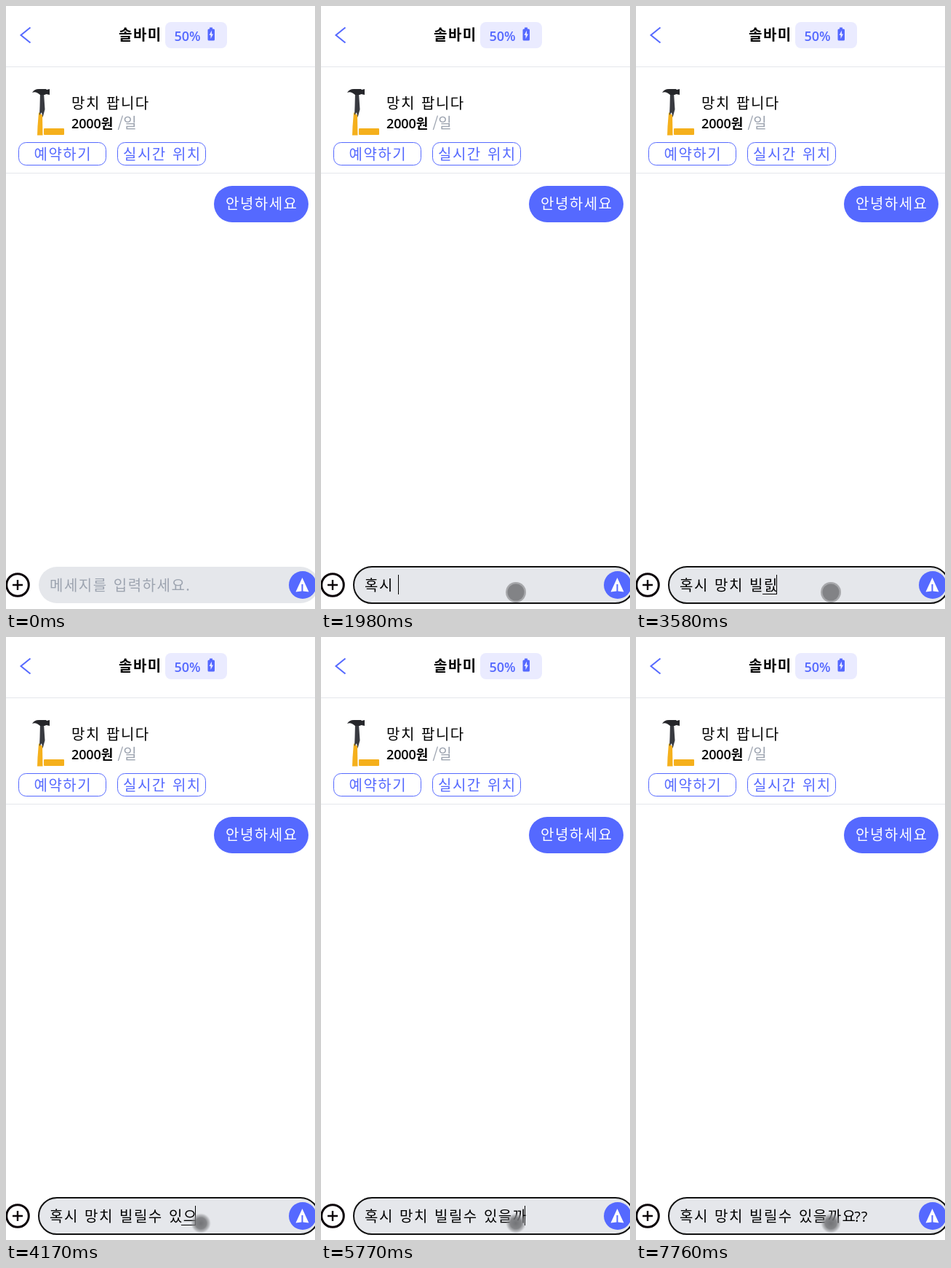
Recreate the animation shown at these times as an HTML page. Size 425 by 828 pixels, loop 8 s.

```html
<!DOCTYPE html>
<html lang="ko">
<head>
<meta charset="utf-8">
<title>Chat</title>
<style>
  html, body { margin: 0; width: 100%; height: 100%; overflow: hidden; background: #fff; }
  svg { display: block; }
  text {
    font: 350 20px "Noto Sans CJK KR", "Noto Sans CJK", sans-serif;
    letter-spacing: 1.5px; word-spacing: 1.1px; white-space: pre;
  }
  .bold { font-weight: 700; }
  .num { font: 600 18px "Open Sans", "Noto Sans CJK KR", sans-serif; letter-spacing: 0; }
  .price { letter-spacing: -.1px; }
  .unit { letter-spacing: 0; }
  .blue { fill: #5569ff; }
  .muted { fill: #9ca3af; }
  .hint { font-size: 16px; letter-spacing: 1.2px; word-spacing: .9px; fill: #757575; }
  .mark { font-family: "Open Sans", sans-serif; font-weight: 400; letter-spacing: 1.1px; }
  .rule { stroke: #e5e7eb; }
  .button { fill: #fff; stroke: #5569ff; }
</style>
</head>
<body>
<svg width="425" height="828" viewBox="0 0 425 828">
  <defs>
    <radialGradient id="soft">
      <stop offset="0" stop-color="#66676a" stop-opacity=".9"/>
      <stop offset=".55" stop-color="#737477" stop-opacity=".85"/>
      <stop offset=".8" stop-color="#8b8c8f" stop-opacity=".5"/>
      <stop offset="1" stop-color="#a5a6a9" stop-opacity="0"/>
    </radialGradient>
    <filter id="shadow" x="-10%" y="-10%" width="120%" height="125%">
      <feDropShadow dx="0" dy="1" stdDeviation="1.8" flood-opacity=".24"/>
    </filter>
  </defs>

  <!-- Header -->
  <path d="M33.5 29.5 20.5 40 33.5 50.5" fill="none" stroke="#5569ff" stroke-width="2"/>
  <text class="bold" x="155" y="47">솔바미</text>
  <rect x="219" y="22" width="85" height="36" rx="8" fill="#eaebff"/>
  <text class="num blue" x="231.5" y="48">50%</text>
  <path class="blue" d="M280 29.5h4v2h1.5q1.5 0 1.5 1.5v13q0 1.5-1.5 1.5h-6.5q-1.5 0-1.5-1.5v-13q0-1.5 1.5-1.5h1z"/>
  <path d="M283 33.5l-3.5 6.5h2v5l3.5-6.5h-2z" fill="#eaebff"/>
  <path class="rule" d="M0 83.5H425M0 229.5H425"/>

  <!-- Item -->
  <path d="M45 146 50 150 50.5 177.5H43L43.5 165z" fill="#f5b01c"/>
  <path d="M47 119H52L53.5 142 50.5 153 49 146 46 150 46.5 138z" fill="#383a40"/>
  <path d="M36 119Q39 114 45 114H55L56 115 60 114V122L55.5 121 53 122H47Q41 116.5 36 119z" fill="#26272b"/>
  <rect x="52" y="168" width="28" height="9" rx="1" fill="#f5b01c"/>
  <text x="90" y="140.5">망치 팝니다</text>
  <text class="num price" x="90" y="167.5">2000원</text>
  <text class="muted unit" x="153.5" y="168">/일</text>
  <rect class="button" x="17.5" y="187.5" width="120" height="31" rx="10"/>
  <text class="blue" x="38.5" y="210.5">예약하기</text>
  <rect class="button" x="153.5" y="187.5" width="121" height="31" rx="10"/>
  <text class="blue" x="161" y="210.5">실시간 위치</text>

  <!-- Message -->
  <rect class="blue" x="286" y="247" width="130" height="50" rx="25"/>
  <text x="302" y="279" fill="#fff">안녕하세요</text>

  <!-- Input bar -->
  <g fill="none" stroke="#0b0408">
    <circle cx="16" cy="795" r="15.3" stroke-width="3"/>
    <path d="M16 788V802M9 795H23" stroke-width="2.4"/>
  </g>
  <rect id="field" x="45" y="770" width="385" height="50" rx="25" fill="#e5e7eb" stroke-width="2"/>
  <text id="empty" class="muted" x="60" y="802.5">메세지를 입력하세요.</text>
  <text id="typed" x="60" y="802.5"></text>
  <text id="marks" class="mark" y="802.5"></text>
  <rect id="under" y="807" width="19" height="1"/>
  <rect id="caret" y="781" width="1" height="27"/>
  <circle class="blue" cx="408" cy="795" r="19"/>
  <path d="M407.5 785 398.5 804.5 406.5 803.5V794H408.5V803.5L416.5 804.5z" fill="#fff"/>

  <!-- Suggestions -->
  <g id="popup">
    <path d="M173 659H388Q392 659 392 663V755Q392 759 388 759H205L195.5 768 186 759H173Q169 759 169 755V663Q169 659 173 659z" fill="#fff" filter="url(#shadow)"/>
    <text class="hint" x="184.5" y="692">안녕하세요</text>
    <text class="hint" x="184.5" y="737">삼각대 대여 가능할까요?</text>
  </g>

  <g id="pointer">
    <g id="ring">
      <circle r="14" fill="#a7a8ab"/>
      <circle r="11.5" fill="#828386"/>
    </g>
    <circle id="blur" r="14" fill="url(#soft)"/>
  </g>
</svg>
<script>
const LOOP = 8000, START = 60, FOCUS = 460, BLINK = 530;
const HANGUL = 19.9, SPACE = 7.1, MARK = 9.85;
const el = id => document.getElementById(id);
const [field, empty, typed, marks, under, caret, popup, pointer, ring, blur] =
  ["field", "empty", "typed", "marks", "under", "caret", "popup", "pointer", "ring", "blur"].map(el);

// time, number of finished characters, syllable being composed
const line = "혹시 망치 빌릴수 있을까요??";
const keys = [
  [FOCUS, 0, ""], [920, 0, "ㅎ"], [980, 0, "호"], [1380, 0, "혹"],
  [1780, 0, "혻"], [1850, 1, "시"], [1980, 3, ""],
  [2170, 3, "ㅁ"], [2240, 3, "마"], [2310, 3, "망"],
  [2500, 4, "ㅊ"], [2570, 4, "치"], [2700, 6, ""],
  [2840, 6, "ㅂ"], [2900, 6, "비"], [2970, 6, "빌"],
  [3180, 7, "ㄹ"], [3250, 7, "리"], [3380, 7, "릴"], [3580, 7, "릸"],
  [3650, 8, "수"], [3720, 10, ""],
  [3840, 10, "ㅇ"], [3910, 10, "이"], [3980, 10, "있"],
  [4100, 11, "ㅇ"], [4170, 11, "으"], [4310, 11, "을"],
  [4500, 12, "ㄲ"], [4570, 12, "까"], [4770, 12, "깡"], [4900, 13, "요"],
  [5570, 13, "ㅇ"], [5770, 13, ""], [6100, 12, ""],
  [6300, 12, "ㄲ"], [6370, 12, "까"], [6570, 12, "깡"], [6630, 13, "요"],
  [7090, 15, ""], [7230, 16, ""]
];
const path = [[130, 292, 828], [190, 282, 818], [250, 273, 809], [320, 268, 805]];
const fade = [[0, 0], [FOCUS, .6], [520, 1], [980, .5], [1050, 0]];

const at = (list, t) => list.filter(k => k[0] <= t).pop();
const advance = c => c === " " ? SPACE : c === "?" ? MARK : HANGUL;
const width = s => [...s].reduce((sum, c) => sum + advance(c), 0);
const show = (node, on) => node.setAttribute("visibility", on ? "inherit" : "hidden");

function drawInput(t) {
  const key = at(keys, t);
  const [since, count, part] = key || [0, 0, ""];
  const done = line.slice(0, count), text = done + part;
  const words = text.replace(/\?/g, "");
  field.setAttribute("stroke", key ? "#111" : "none");
  show(empty, !text);
  typed.textContent = words;
  marks.textContent = text.slice(words.length);
  marks.setAttribute("x", START + width(words));
  show(under, part);
  under.setAttribute("x", Math.round(START + width(done)));
  show(caret, key && Math.floor((t - since) / BLINK) % 2 === 0);
  caret.setAttribute("x", Math.floor(START + width(text)));
}

function drawPointer(t) {
  const spot = at(path, t), over = t >= 4170;
  if (spot) pointer.setAttribute("transform", `translate(${spot[1]} ${spot[2]})`);
  show(ring, spot && !over);
  show(blur, spot && over);
}

function draw(t) {
  drawInput(t);
  drawPointer(t);
  popup.setAttribute("opacity", at(fade, t)[1]);
}

const begin = performance.now();
function tick() {
  draw((performance.now() - begin) % LOOP);
  requestAnimationFrame(tick);
}
tick();
</script>
</body>
</html>
```
